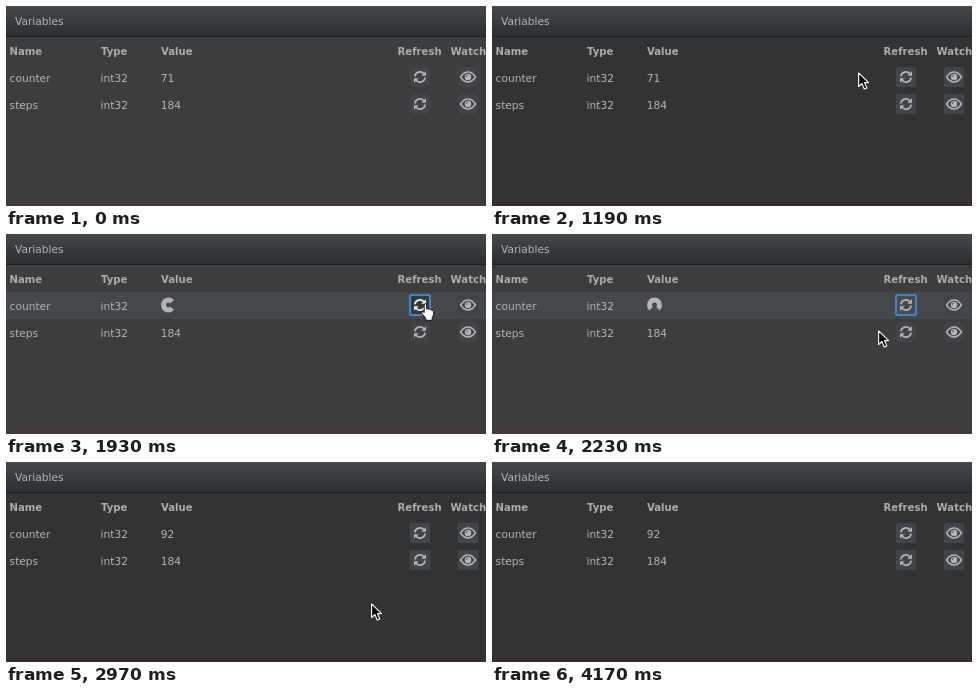
Write an HTML page that moves like this. It is 480x200 px and loops after 5.03 s.

```html
<!DOCTYPE html>
<html lang="en">
<head>
<meta charset="utf-8">
<title>Variables</title>
<style>
  html, body { margin: 0; width: 100%; height: 100%; overflow: hidden; background: #333; }
  svg { display: block; width: 480px; height: 200px; }
  text { font: 10.65px "DejaVu Sans", "Open Sans", sans-serif; fill: #b4b4b4; }
  .head { font-size: 10.1px; font-weight: bold; fill: #acacac; }
</style>
</head>
<body>
<svg viewBox="0 0 480 200">
  <defs>
    <linearGradient id="bar" x2="0" y2="1">
      <stop offset="0" stop-color="#44484b"/>
      <stop offset="1" stop-color="#2b2f32"/>
    </linearGradient>
    <g id="refresh" fill="none" stroke-width="1.7">
      <g id="half">
        <path d="M-5.1 -.6A5.1 5.1 0 0 1 3.9 -3.3"/>
        <path d="M6 -5.8V-1.2H1.4Z" fill="currentColor" stroke="none"/>
      </g>
      <use href="#half" transform="rotate(180)"/>
    </g>
    <g id="eye">
      <path d="M-7.4 0Q-4.2 -5 0 -5T7.4 0Q4.2 5 0 5T-7.4 0Z" fill="none" stroke-width="1.5"/>
      <circle r="3.2" fill="currentColor" stroke="none"/>
      <path d="M-1.7 -.2A1.7 1.7 0 0 1 0 -1.9" fill="none" stroke="#44474b" stroke-width=".9"/>
    </g>
  </defs>

  <rect id="bg" width="480" height="200"/>
  <rect width="480" height="30" fill="url(#bar)"/>
  <rect y="30" width="480" height="1" fill="#1c1d1e"/>
  <rect id="foot" y="196" width="480" height="4"/>
  <text x="9" y="19">Variables</text>

  <rect id="hover" y="58" width="480" height="27" fill="#44474b"/>
  <g class="head">
    <text class="head" x="3.6" y="49">Name</text>
    <text class="head" x="95" y="49">Type</text>
    <text class="head" x="155" y="49">Value</text>
    <text class="head" x="391.6" y="49">Refresh</text>
    <text class="head" x="444.6" y="49">Watch</text>
  </g>
  <text x="3.6" y="76">counter</text>
  <text x="94.6" y="76">int32</text>
  <text id="value" x="154.8" y="76"></text>
  <text x="3.6" y="103">steps</text>
  <text x="94.6" y="103">int32</text>
  <text x="154.8" y="103">184</text>

  <g id="buttons"></g>
  <path id="spinner" fill="none" stroke="#b4b4b4" stroke-width="5"/>

  <path id="arrow" d="M.6 .8V14.6L3.9 11.5 6.2 17 8.8 15.9 6.5 10.6H10.6Z"
    fill="#0a0a0a" stroke="#fff" stroke-width="1.1" stroke-linejoin="round"/>
  <path id="hand" d="M3.2 9.6V2.2Q3.2 .6 4.4 .6T5.7 2.2V6Q7.4 4.9 8.1 6.4 9.6 5.6 10.3 7.1 12.6 6.8 12.6 8.8V11.5L11.2 14.8V17.3H4.8V15.3L.9 10.6Q.3 9.3 1.2 8.7T3.2 9.6Z"
    fill="#fff" stroke="#151515" stroke-width="1" stroke-linejoin="round"/>
</svg>
<script>
const LOOP = 5030;
const $ = id => document.getElementById(id);
const between = (t, from, to) => t >= from && t < to;
const show = (el, on) => el.setAttribute("display", on ? "inline" : "none");
const place = (el, x, y) => el.setAttribute("transform", `translate(${x} ${y})`);

// Pointer stops: start time, x, y, shape
const pointer = [
  [0, 0, 0, ""],
  [450, 449, 22, "arrow"],
  [600, 409, 43, "arrow"],
  [740, 389, 63, "arrow"],
  [890, 366, 66, "arrow"],
  [1340, 400, 66, "arrow"],
  [1490, 415, 69, "hand"],
  [2230, 386, 96, "arrow"],
  [2380, 371, 129, "arrow"],
  [2520, 365, 141, "arrow"],
  [4020, 407, 170, "arrow"],
  [4170, 0, 0, ""]
];
const turns = [2080, 2230, 2380, 2520, 2670, 2820];

function add(parent, tag, attrs) {
  const el = document.createElementNS("http://www.w3.org/2000/svg", tag);
  for (const key in attrs) el.setAttribute(key, attrs[key]);
  return parent.appendChild(el);
}

function makeButton(x, y, icon) {
  const g = add($("buttons"), "g", { transform: `translate(${x} ${y})` });
  const box = add(g, "rect", { x: -10, y: -10, width: 20, height: 20 });
  const mark = add(g, "use", { href: "#" + icon });
  return { box, mark, row: y < 85 ? 1 : 2 };
}

const buttons = [71, 98].flatMap(y => [makeButton(414, y, "refresh"), makeButton(462, y, "eye")]);

function paintButton(button, dark, hover, focus, active) {
  const { box, mark, row } = button;
  let fill = dark ? "#424549" : "#424448";
  if (hover && row === 1) fill = "#414549";
  if (focus) fill = active ? "#34383c" : "#484b4f";
  box.setAttribute("fill", fill);
  box.setAttribute("rx", focus ? 1.5 : dark ? 1 : 5);
  box.setAttribute("stroke", focus ? "#4a80bd" : "none");
  box.setAttribute("stroke-width", 2.2);
  const ink = active ? "#f2f2f2" : "#b2b4b5";
  mark.setAttribute("stroke", ink);
  mark.setAttribute("color", ink);
}

function ring(cx, cy, r, from, sweep) {
  const at = deg => {
    const a = deg * Math.PI / 180;
    return `${(cx + r * Math.cos(a)).toFixed(2)} ${(cy + r * Math.sin(a)).toFixed(2)}`;
  };
  return `M${at(from)}A${r} ${r} 0 1 1 ${at(from + sweep)}`;
}

function draw(t) {
  const dark = between(t, 1190, 1930) || t >= 2820;
  const hover = between(t, 1340, 2380);
  const focus = between(t, 1930, 2820);
  const active = between(t, 1930, 2230);
  const loading = between(t, 1930, 2970);

  $("bg").setAttribute("fill", dark ? "#333333" : "#3d3d3d");
  $("foot").setAttribute("fill", dark ? "#392d30" : "#43383b");
  show($("hover"), hover);
  buttons.forEach((b, i) => paintButton(b, dark, hover, focus && i === 0, active && i === 0));

  $("value").textContent = loading ? "" : t < 1930 ? "71" : "92";
  show($("spinner"), loading);
  const angle = 45 * turns.filter(start => t >= start).length;
  $("spinner").setAttribute("d", ring(162.5, 71, 5, angle + 42, 276));

  const [, x, y, shape] = pointer.filter(stop => t >= stop[0]).pop();
  for (const id of ["arrow", "hand"]) {
    show($(id), shape === id);
    place($(id), x, y);
  }
}

const start = performance.now();
function tick() {
  draw((performance.now() - start) % LOOP);
  requestAnimationFrame(tick);
}
tick();
</script>
</body>
</html>
```
